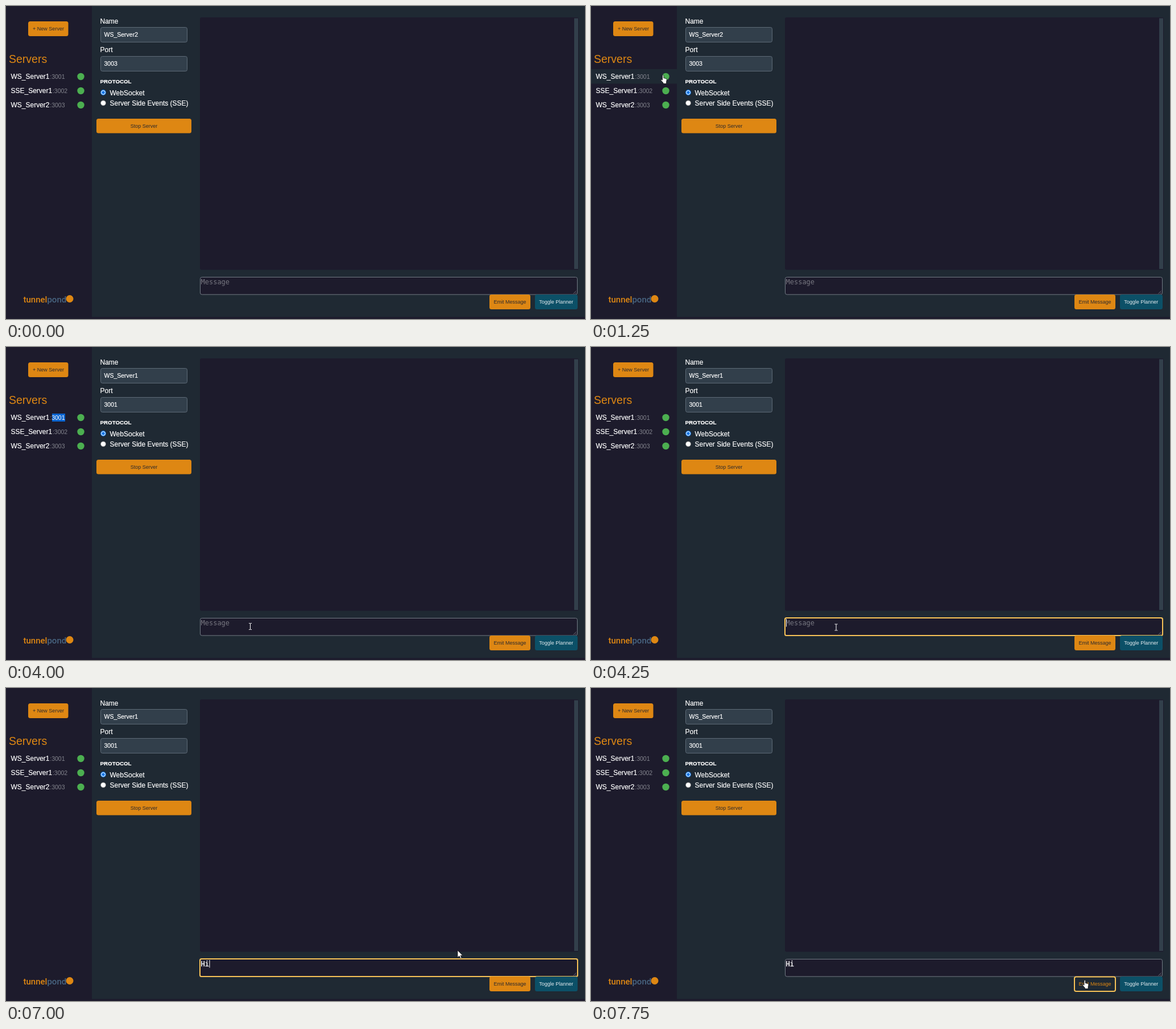
Animation, 1018 px wide and 550 px high, one loop 8 s. Source, as an HTML page:

```html
<!DOCTYPE html>
<html lang="en">
<head>
<meta charset="utf-8">
<title>Server panel</title>
<style>
html, body { margin: 0; width: 100%; height: 100%; overflow: hidden; background: #1f2933; }
svg { display: block; width: 1018px; height: 550px; font: 12px "Liberation Sans", Arial, sans-serif; }
.white { fill: #fff; stroke: #fff; stroke-width: .2; }
.dark { fill: #1d1b2c; }
.field { fill: #323f4b; stroke: #5d6a76; }
.input { font-size: 10.5px; }
.port { fill: #84858e; stroke: none; font-size: 10.5px; }
.button { fill: #de8713; }
.label { font-size: 9px; text-anchor: middle; fill: #2d2a2e; }
.hover .button { fill: #1f2933; }
.hover .label { fill: #de8713; }
.mono { font-family: "DejaVu Sans Mono", monospace; }
.ring { fill: none; stroke: #f7c257; stroke-width: 2; }
</style>
</head>
<body>
<svg viewBox="0 0 1018 550">
  <rect width="1018" height="550" fill="#1f2933"/>
  <rect class="dark" width="151" height="550"/>
  <rect class="dark" y="546.5" width="1018" height="3.5"/>

  <rect class="button" x="39" y="27" width="70.500" height="26" rx="3.500"/>
  <text class="label" x="74.500" y="43">+ New Server</text>
  <text x="5" y="100" font-size="19.5" fill="#de8713">Servers</text>
  <rect id="rowHover" y="111" width="151" height="25.500" fill="#1f2933"/>
  <rect id="selection" x="81" y="117" width="23" height="14" fill="#0a63cf"/>
  <g id="rows"></g>
  <text x="30.500" y="520.500" font-family="Roboto, sans-serif" font-size="15" font-weight="500" fill="#de8713">tunnel<tspan fill="#486581">pond</tspan></text>
  <circle cx="112" cy="514.500" r="6.500" fill="#de8713"/>

  <text class="white" x="165.500" y="30.500">Name</text>
  <rect class="field" x="166.500" y="37.500" width="152" height="26" rx="3"/>
  <text class="white input" id="name" x="172.500" y="54"></text>
  <text class="white" x="165.500" y="81">Port</text>
  <rect class="field" x="166.500" y="88.500" width="152" height="26" rx="3"/>
  <text class="white input" id="port" x="172.500" y="105"></text>
  <text class="white" x="165.500" y="136" font-size="9.75" font-weight="bold" stroke="none">PROTOCOL</text>
  <circle cx="171" cy="152" r="4.300" fill="#fff" stroke="#0b74e8" stroke-width="1.200"/>
  <circle cx="171" cy="152" r="2.700" fill="#0b74e8"/>
  <text class="white" x="182.500" y="156.500">WebSocket</text>
  <circle cx="171" cy="170.500" r="4.500" fill="#fff" stroke="#767676" stroke-width=".7"/>
  <text class="white" x="182.500" y="175">Server Side Events (SSE)</text>
  <g id="stop">
    <rect class="button" x="159" y="198" width="167" height="25.500" rx="3.500"/>
    <text class="label" x="242.500" y="213.500">Stop Server</text>
  </g>

  <rect class="dark" x="341" y="20" width="666" height="443.500" rx="3"/>
  <rect x="999" y="21.500" width="7" height="440.500" fill="#323f4b"/>
  <rect class="dark" x="341.500" y="476.500" width="663" height="30.500" rx="3" stroke="#727a84"/>
  <path d="M997.500 505.500l5-5M1000.500 505.500l2-2" stroke="#8b8d95" stroke-width=".7"/>
  <rect class="ring" id="boxRing" x="341" y="476" width="664" height="31" rx="2.500"/>
  <text class="mono" id="hint" x="342.500" y="489" fill="#777780">Message</text>
  <text class="mono white" id="typed" x="342.500" y="489" style="stroke-width:.4"></text>
  <rect id="caret" y="478" width="1" height="13.500" fill="#fff"/>

  <g id="emit">
    <rect class="button" x="850" y="507" width="72" height="26" rx="3.500"/>
    <text class="label" x="886" y="523">Emit Message</text>
  </g>
  <rect class="ring" id="emitRing" x="850" y="507.500" width="72" height="25.500" rx="3"/>
  <rect x="930" y="507" width="75" height="26" rx="3.500" fill="#0c5067"/>
  <text class="label" x="967.300" y="523" style="fill:#e4ebef">Toggle Planner</text>

  <path id="arrow" d="M0 0V12.500L3 9.800L5 14.200L7 13.300L5.100 9.100H9Z" fill="#fff" stroke="#111" stroke-width=".7"/>
  <path id="hand" d="M3 1.500Q4.300 0 5.300 1.500V6L9.500 7Q11 7.400 10.800 9L10 13V16H4.500V14.500L.5 10Q0 8.500 1.500 8.500L3 9.700Z" fill="#fff" stroke="#111" stroke-width=".8"/>
  <path id="beam" d="M-2.500 -5.500H-.7L0 -5L.7 -5.500H2.500M0 -5V5M-2.500 5.500H-.7L0 5L.7 5.500H2.500" fill="none" stroke="#fff"/>
</svg>
<script>
const $ = id => document.getElementById(id);
const show = (id, on) => $(id).style.display = on ? "" : "none";
const LOOP = 8000;

$("rows").innerHTML = ["WS_Server1", "SSE_Server1", "WS_Server2"].map((name, i) => `
  <text class="white" x="8.500" y="${128 + 25 * i}">${name}<tspan class="port" dx=".7">:</tspan><tspan class="port" id="num${i}">300${i + 1}</tspan></text>
  <circle cx="131.500" cy="${124 + 25 * i}" r="6.200" fill="#4caf50"/>`).join("");

// The pointer jumps: start time, shape, x, y
const pointer = [
  [0, "", 0, 0],
  [250, "arrow", 474, 521], [500, "arrow", 344, 364], [750, "arrow", 221, 251],
  [1000, "hand", 179, 203], [1250, "hand", 122.5, 120.5], [1500, "hand", 97, 115],
  [1750, "hand", 86, 117.5], [3250, "arrow", 227, 181], [3500, "arrow", 370, 363.5],
  [3750, "arrow", 413.5, 471], [4000, "beam", 429.5, 491], [4250, "beam", 431, 492.5],
  [6750, "arrow", 533, 429], [7000, "arrow", 794, 461], [7250, "hand", 864, 512.5]
];

function render(t) {
  const within = (from, to) => t >= from && t < to;

  const [, shape, x, y] = pointer.findLast(p => p[0] <= t);
  for (const id of ["arrow", "hand", "beam"]) show(id, id === shape);
  if (shape) $(shape).setAttribute("transform", `translate(${x} ${y})`);

  const server = t < 2500 ? ["WS_Server2", "3003"] : ["WS_Server1", "3001"];
  $("name").textContent = server[0];
  $("port").textContent = server[1];

  const selected = within(2500, 4250);
  show("selection", selected);
  $("num0").style.fill = selected ? "#fff" : "";
  show("rowHover", within(1250, 3250));
  $("stop").classList.toggle("hover", within(1000, 1250));
  $("emit").classList.toggle("hover", t >= 7250);

  const text = "Hi".slice(0, t < 5500 ? 0 : t < 6000 ? 1 : 2);
  $("typed").textContent = text;
  show("hint", !text);
  show("boxRing", within(4250, 7750));
  show("emitRing", t >= 7750);
  $("caret").setAttribute("x", 343 + 7.22 * text.length);
  show("caret", within(4250, 5000) || within(5500, 6500) || within(7000, 7500));
}

function tick() {
  render(performance.now() % LOOP);
  requestAnimationFrame(tick);
}
tick();
</script>
</body>
</html>
```
